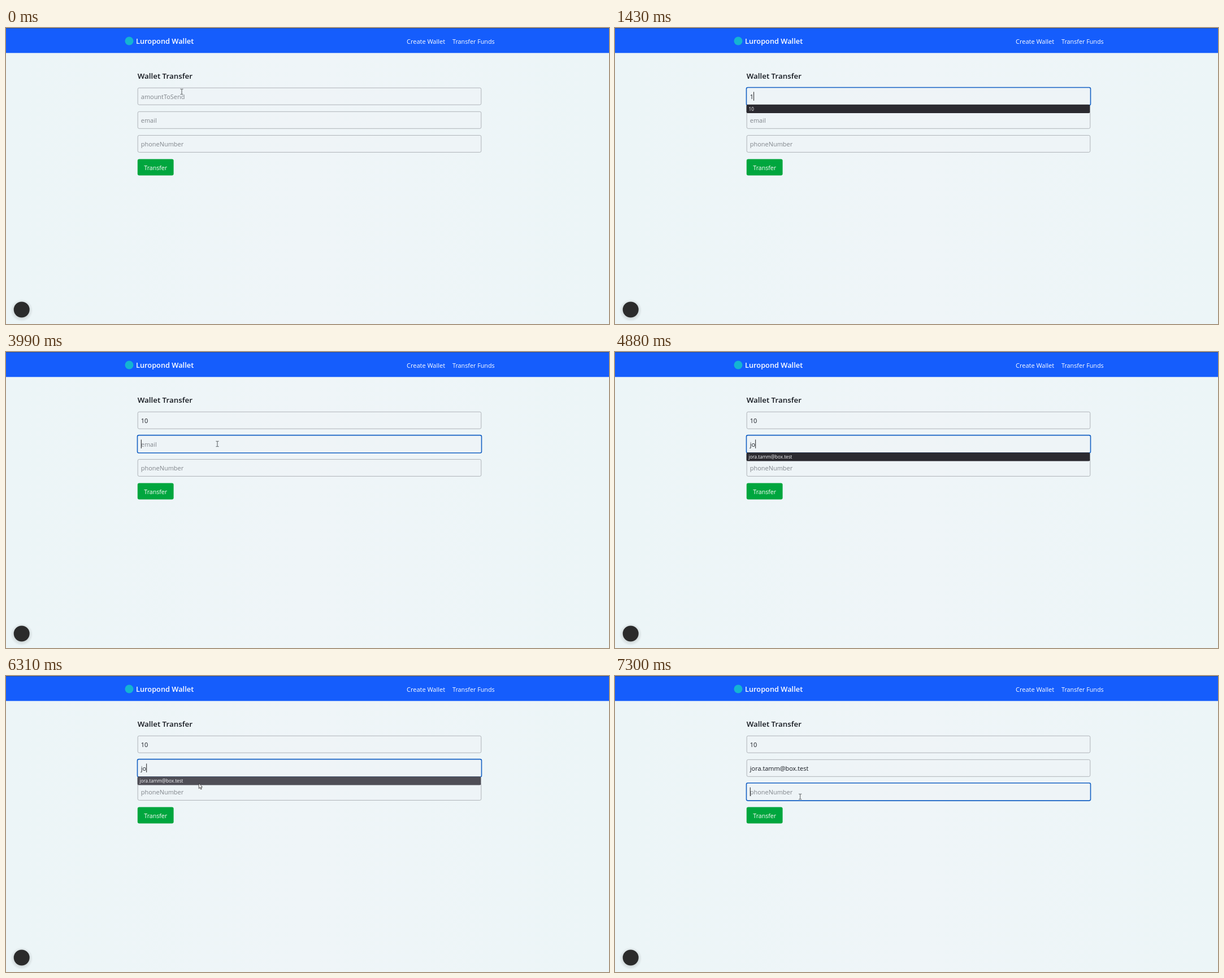
Recreate the animation shown at these times as an HTML page. Size 1067 by 525 pixels, loop 8 s.

```html
<!DOCTYPE html>
<html lang="en">
<head>
<meta charset="utf-8">
<title>Wallet Transfer</title>
<style>
  html, body { margin: 0; width: 100%; height: 100%; overflow: hidden; background: #eef5f8; }
  svg { display: block; width: 100%; height: 100%; font-family: "Open Sans", "Noto Sans", sans-serif; }
  .field text { font-size: 10.95px; }
  .box { x: 233.2px; y: 106.2px; width: 607.6px; height: 30px; fill: #eff4f7; fill-opacity: .5; stroke: #aeb3b8; }
  .focus .box { x: 232.5px; y: 105.5px; width: 609px; height: 31.4px; stroke: #1561c4; stroke-width: 1.6; }
  .nav { fill: #fff; }
</style>
</head>
<body>
<svg viewBox="0 0 1067 525">
  <defs>
    <linearGradient id="page">
      <stop offset="0" stop-color="#ecf5f7"/>
      <stop offset=".5" stop-color="#eff5f8"/>
      <stop offset="1" stop-color="#ecf5f7"/>
    </linearGradient>
    <radialGradient id="halo">
      <stop offset=".6" stop-color="#000" stop-opacity=".13"/>
      <stop offset="1" stop-color="#000" stop-opacity="0"/>
    </radialGradient>
  </defs>
  <rect width="1067" height="525" fill="url(#page)"/>
  <rect width="1067" height="44.3" fill="#155dfc"/>
  <rect width="1067" height="1" fill="#264f9f"/>
  <circle cx="218" cy="23" r="7.5" fill="#14b4d2"/>
  <g class="nav">
    <text x="230" y="28" font-size="12.8" font-weight="600">Luropond Wallet</text>
    <text x="709" y="27.6" font-size="11">Create Wallet</text>
    <text x="790" y="27.6" font-size="10.75">Transfer Funds</text>
  </g>
  <text x="232.7" y="90" font-size="13.35" font-weight="600" fill="#14181f">Wallet Transfer</text>
  <g id="fields"></g>
  <rect x="232.8" y="232.4" width="63.8" height="29.2" rx="3" fill="#00a63e"/>
  <text x="244.3" y="252" font-size="10.6" fill="#fff">Transfer</text>
  <circle cx="27.7" cy="501" r="20" fill="url(#halo)"/>
  <circle cx="27.7" cy="499.5" r="14" fill="#2b2b2b"/>
  <g id="menu">
    <rect x="232.5" width="608" height="15.3" rx="2.5"/>
    <text x="236.5" y="10.8" font-size="8.15" fill="#fbfbfe"></text>
  </g>
  <rect id="caret" width="1" height="15.5" fill="#222"/>
  <path id="beam" d="M-2.5-4.7H-.7L0-4.2L.7-4.7H2.5M0-4.2V4.2M-2.5 4.7H-.7L0 4.2L.7 4.7H2.5" fill="none" stroke="#45484b" stroke-width=".9"/>
  <path id="arrow" d="M0 0V9.2L2.1 7.3L3.5 10.6L5 10L3.6 6.8H6.2Z" fill="#fff" stroke="#222" stroke-width=".8"/>
</svg>
<script>
const LOOP = 8000, BLINK = 535, LEFT = 238.8, ROW = 42.1;
const MAIL = "jora.tamm@box.test";
const hints = ["amountToSend", "email", "phoneNumber"];

// The user's actions, in ms
const focusAt = [710, 3810, 7220];
const amountKeys = [1350, 1700], mailKeys = [4620, 4880];
const keys = [...amountKeys, ...mailKeys];
const pick = { down: 2160, amount: 2530, press: 6670, mail: 6760 };
const caretResets = [820, ...keys, pick.amount, 3990, 6310, pick.mail, focusAt[2]];

// Mouse strokes; "via" bends the path
const strokes = [
  { start: 0, end: 250, from: [311, 113], to: [311, 120] },
  { start: 3290, end: 3630, from: [352, 124], via: [475, 145], to: [374, 163] },
  { start: 5680, end: 6030, from: [362, 194], to: [346, 189.5] },
  { start: 6180, end: 6320, from: [346, 189.5], via: [343, 200], to: [341, 189] },
  { start: pick.press, end: 6850, from: [341.7, 189], to: [327.7, 214] }
];

const $ = id => document.getElementById(id);
const move = (el, x, y) => el.setAttribute("transform", `translate(${x} ${y})`);
const show = (el, on) => el.style.display = on ? "" : "none";
const count = (times, t) => times.filter(k => k <= t).length;
const last = (times, t) => Math.max(0, ...times.filter(k => k <= t));
const within = (t, a, b) => t >= a && t < b;

function pointerAt(t) {
  const { start, end, from, via, to } = strokes.findLast(s => s.start <= t);
  const u = Math.min(1, (t - start) / (end - start));
  const [x, y] = from.map((a, i) => {
    const b = to[i], mid = via ? via[i] : (a + b) / 2;
    return a * (1 - u) ** 2 + 2 * mid * u * (1 - u) + b * u * u;
  });
  return { x, y, hidden: last(keys, t) > start }; // typing hides the mouse
}

$("fields").innerHTML = hints.map((_, i) => `<g class="field" transform="translate(0 ${ROW * i})">
  <rect class="box" rx="2.5"/><text x="${LEFT}" y="126"></text></g>`).join("");
const fields = [...$("fields").children];
const [menuBox, menuText] = $("menu").children;

function draw(t) {
  const focus = count(focusAt, t) - 1;
  const values = [
    "10".slice(0, count(amountKeys, t)),
    t < pick.mail ? MAIL.slice(0, count(mailKeys, t)) : MAIL,
    ""
  ];
  fields.forEach((g, i) => {
    const label = g.lastElementChild;
    g.classList.toggle("focus", i === focus);
    label.textContent = values[i] || hints[i];
    label.setAttribute("fill", values[i] ? "#14181f" : "#7f848a");
  });

  const mouse = pointerAt(t);
  const open = within(t, 1430, pick.amount) || within(t, 4700, pick.press);
  const top = 135.8 + 42.4 * focus;
  const lit = focus ? !mouse.hidden && within(mouse.y, top, top + 15.3) : t >= pick.down;
  show($("menu"), open);
  move($("menu"), 0, top);
  menuBox.setAttribute("fill", lit ? "#4f4e56" : "#2b2a30");
  menuText.textContent = focus ? MAIL : "10";

  const on = Math.floor((t - last(caretResets, t)) / BLINK) % 2 === 0;
  show($("caret"), focus >= 0 && on);
  if (focus >= 0) {
    const width = values[focus] ? fields[focus].lastElementChild.getComputedTextLength() : 0;
    move($("caret"), LEFT + width, 113.3 + ROW * focus);
  }

  show($("beam"), !mouse.hidden && !open);
  show($("arrow"), !mouse.hidden && open);
  move($(open ? "arrow" : "beam"), mouse.x, mouse.y);
}

const begin = performance.now();
function tick() {
  draw((performance.now() - begin) % LOOP);
  requestAnimationFrame(tick);
}
tick();
</script>
</body>
</html>
```
